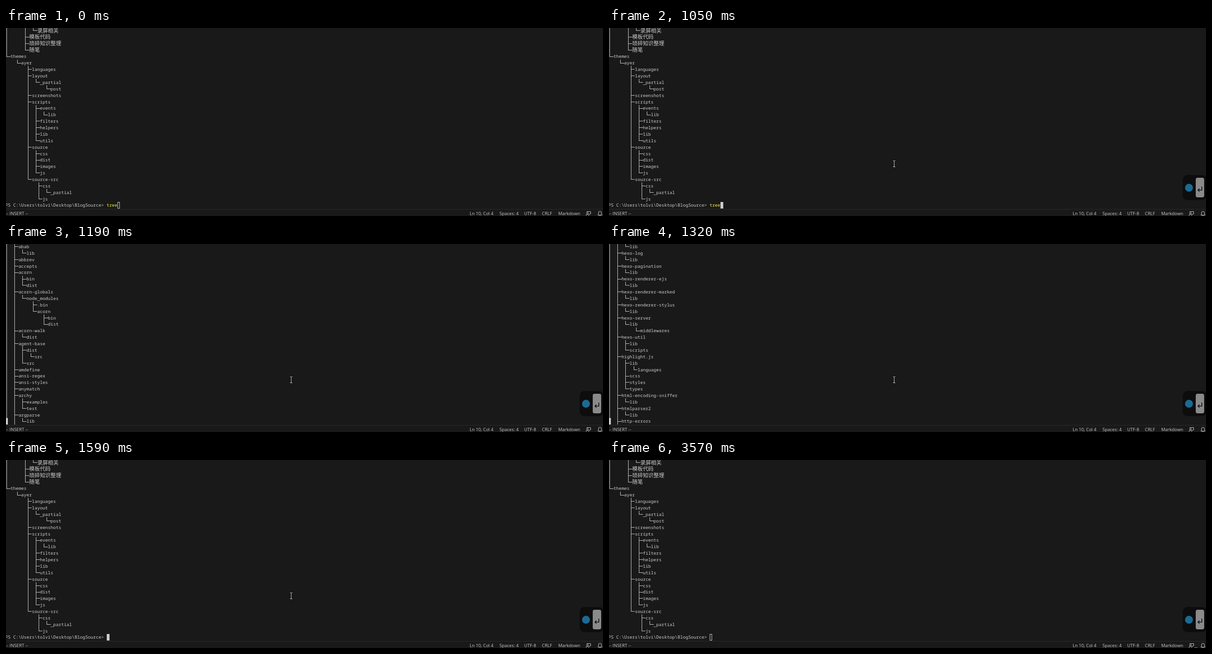
An HTML page with a canvas for the animation above (3700 ms loop, 1280 by 403 pixels).

```html
<!DOCTYPE html>
<html lang="zh-CN">
<head>
<meta charset="utf-8">
<title>tree</title>
<style>
html, body { margin: 0; height: 100%; overflow: hidden; background: #191919; }
canvas { display: block; }
</style>
</head>
<body>
<canvas id="stage" width="1280" height="403"></canvas>
<script>
const g = document.getElementById('stage').getContext('2d');
const LOOP = 3700, ROWS = 28, X0 = -1.7, CELL = 5.72, PITCH = 13.87, MID = 5.2;
const INK = '#cccccc', BACK = '#191919';
const MONO = '9.53px "Noto Sans Mono", monospace';
const HAN = '11.4px "Noto Sans CJK SC", "Noto Sans CJK", sans-serif';
const UI = '9.5px "Open Sans", sans-serif';
const PROMPT = 'PS C:\\Users\\tolvi\\Desktop\\BlogSource> ';

// A folder is a name, or [name, ...children]
const names = text => text.split(' ');
const withLib = text => names(text).map(name => [name, 'lib']);

const plugins = ['plugins',
  ...names('autolinker command-line custom-class diff-highlight'),
  ...names('inline-color jsonp-highlight keep-markup line-highlight'),
  ...names('line-numbers match-braces normalize-whitespace previewers'),
  ...names('remove-initial-line-feed show-invisibles show-language'),
  ...names('toolbar treeview unescaped-markup wpd')];

const modules = ['node_modules', '.bin',
  ['abab', 'lib'], 'abbrev', 'accepts',
  ['acorn', 'bin', 'dist'],
  ['acorn-globals', ['node_modules', '.bin', ['acorn', 'bin', 'dist']]],
  ['acorn-walk', 'dist'],
  ['agent-base', ['dist', 'src'], 'src'],
  ...names('amdefine ansi-regex ansi-styles anymatch'),
  ['archy', 'examples', 'test'],
  ...withLib('argparse asn1'),
  ...names('assert-plus atob aws-sign2 balanced-match basic-auth'),
  ['bluebird', ['js', 'browser', 'release']],
  ...names('brace-expansion bytes caseless'),
  ['camel-case', 'dist', 'dist.es2015'],
  ['chokidar', 'lib', 'types'],
  ...names('color-convert color-name compressible connect'),
  ...withLib('combined-stream cssom depd'),
  ['ejs', 'bin', 'lib'],
  ...names('fill-range fsevents graceful-fs has-flag'),
  ...withLib('hexo-fs hexo-i18n hexo-log hexo-pagination'),
  ...withLib('hexo-renderer-ejs hexo-renderer-marked'),
  ...withLib('hexo-renderer-stylus'),
  ['hexo-server', ['lib', 'middlewares']],
  ['hexo-util', 'lib', 'scripts'],
  ['highlight.js', ['lib', 'languages'], 'scss', 'styles', 'types'],
  ...withLib('html-encoding-sniffer htmlparser2'),
  ...names('http-errors inflight inherits is-binary-path'),
  ...names('is-extglob is-glob is-number isarray'),
  ['js-yaml', 'bin', 'dist', 'lib'],
  ...withLib('jsdom levn'),
  ['marked', 'bin', 'lib', 'src'],
  ...names('micromatch minimatch ms'),
  ['moment', 'dist', 'locale', 'min'],
  ...withLib('negotiator parse5 picomatch'),
  ['prismjs', 'components', plugins, 'themes'],
  ['psl', 'data', 'dist'],
  ...names('punycode range-parser'),
  ['readable-stream', 'lib'], 'readdirp',
  ['resolve', 'example', 'lib', 'test'],
  ...names('rimraf safe-buffer safer-buffer'),
  ['sax', 'lib'],
  ...names('saxes send serve-static'),
  ['source-map', 'dist', 'lib'],
  ...names('statuses strip-ansi supports-color text-table'),
  ['stylus', 'bin', 'lib'],
  ...withLib('symbol-tree tough-cookie type-check'),
  ...names('unpipe vary xmlchars yallist')];

const source = ['source',
  ['_posts', ['工具', '录屏相关'], '模板代码', '琐碎知识整理', '随笔']];

const themes = ['themes', ['ayer', 'languages',
  ['layout', ['_partial', 'post']],
  'screenshots',
  ['scripts', ['events', 'lib'], 'filters', 'helpers', 'lib', 'utils'],
  ['source', 'css', 'dist', 'images', 'js'],
  ['source-src', ['css', '_partial'], 'js']]];

function listing(folders, indent = '') {
  return folders.flatMap((folder, i) => {
    const [name, ...kids] = [folder].flat();
    const last = i === folders.length - 1;
    return [indent + (last ? '└─' : '├─') + name,
      ...listing(kids, indent + (last ? '    ' : '│  '))];
  });
}
const tree = listing([modules, 'scaffolds', source, themes]);
const lines = [...tree.slice(1 - ROWS), PROMPT + 'tree', 'C:.', ...tree, PROMPT];

// First visible line at each scroll step
const at = text => lines.indexOf(text);
const half = (a, b) => Math.round((a + b) / 2);
const top1 = at('│  ├─abab'), top2 = at('│  ├─hexo-log') - 1;
const top3 = at('│  │  │  ├─inline-color'), end = lines.length - ROWS;
const scroll = [[0, 0], [1120, 3], [1190, top1], [1250, half(top1, top2)], [1320, top2],
  [1390, half(top2, top3)], [1460, top3], [1520, half(top3, end)], [1590, end]];

const mouse = [[0, 0, 500], [180, 1039, 388], [250, 800, 282], [310, 681, 287],
  [580, 668, 288], [650, 634, 290], [720, 611, 291], [2050, 668, 300],
  [2120, 910, 340], [2180, 1210, 393], [2250, 0, 500], [3570, 1258, 409]];

const current = (steps, t) => steps.findLast(s => s[0] <= t);

function rect(x, y, w, h, color = INK) {
  g.fillStyle = color;
  g.fillRect(x, y, w, h);
}
function round(x, y, w, h, r, color) {
  g.fillStyle = color;
  g.beginPath();
  g.roundRect(x, y, w, h, r);
  g.fill();
}
function line(width, color, ...points) {
  g.lineWidth = width;
  g.strokeStyle = color;
  g.beginPath();
  points.forEach(([x, y]) => g.lineTo(x, y));
  g.stroke();
}
function arc(x, y, r, from, to) {
  g.lineWidth = 1;
  g.strokeStyle = INK;
  g.beginPath();
  g.arc(x, y, r, from * Math.PI, to * Math.PI);
  g.stroke();
}

function drawLine(text, row) {
  const mid = MID + row * PITCH, y = Math.round(mid);
  const top = Math.round(mid - PITCH / 2), bottom = Math.round(mid + PITCH / 2);
  let col = 0;
  for (const ch of text) {
    const x = X0 + col * CELL, cx = Math.round(x + CELL / 2), right = Math.round(x + CELL);
    if ('│├└'.includes(ch)) rect(cx, top, 1, (ch === '└' ? y + 1 : bottom) - top);
    if ('├└'.includes(ch)) rect(cx, y, right - cx, 1);
    else if (ch === '─') rect(Math.round(x), y, right - Math.round(x), 1);
    else if (ch !== '│' && ch !== ' ') {
      const wide = ch >= '一';
      g.font = wide ? HAN : MONO;
      g.fillStyle = col >= PROMPT.length ? '#f5f543' : INK;
      g.fillText(ch, x, mid + (wide ? 4.4 : 3.8));
      if (wide) col++;
    }
    col++;
  }
}

function drawCaret(t) {
  const col = t < 1120 ? PROMPT.length + 4 : t < 1590 ? 0 : PROMPT.length;
  const x = Math.round(X0 + col * CELL);
  if (t >= 850 && t < 3570) rect(x, 373, 6, 14);
  else {
    g.lineWidth = 1;
    g.strokeStyle = INK;
    g.strokeRect(x + .5, 373.5, 4, 13);
  }
}

function drawStatus() {
  rect(0, 387, 1280, 16, BACK);
  rect(0, 388, 1280, 1, '#2b2b2b');
  g.font = UI;
  g.fillStyle = INK;
  [['-- INSERT --', -1], ['Ln 10, Col 4', 994], ['Spaces: 4', 1058], ['UTF-8', 1111],
    ['CRLF', 1149], ['Markdown', 1184]].forEach(([text, x]) => g.fillText(text, x, 401.3));
  // Feedback and bell icons
  line(1, INK, [1245.5, 394.5], [1245.5, 393.5], [1253.5, 393.5], [1253.5, 398.5],
    [1252, 398.5], [1250.5, 400], [1250.5, 398.5]);
  arc(1246.6, 397, 1.8, 0, 2);
  arc(1246.6, 402.5, 3.1, 1, 2);
  arc(1273.5, 396.2, 3.2, 1, 2);
  line(1, INK, [1270.3, 396], [1270.3, 399], [1269, 401], [1278, 401], [1276.7, 399], [1276.7, 396]);
  arc(1273.5, 401.5, 1.5, 0, 1);
}

function drawKey() {
  round(1230, 315, 52, 54, 10, '#0d0d0d');
  round(1235, 334, 17, 17, 8.5, '#1c6a94');
  round(1258, 321, 18, 42, 4, '#8a8a8a');
  line(1.7, '#111', [1271, 340], [1271, 347.5], [1263, 347.5]);
  line(1.7, '#111', [1266, 344.3], [1262.8, 347.5], [1266, 350.7]);
}

function drawMouse([, x, y]) {
  rect(x, y - 6, 1, 13);
  for (const edge of [y - 7, y + 6]) {
    rect(x - 2, edge, 2, 1);
    rect(x + 1, edge, 2, 1);
  }
}

function draw(now) {
  const t = now % LOOP, first = current(scroll, t)[1];
  rect(0, 0, 1280, 403, BACK);
  lines.slice(first, first + ROWS).forEach(drawLine);
  drawCaret(t);
  drawStatus();
  if (t >= 1050) drawKey();
  drawMouse(current(mouse, t));
  requestAnimationFrame(draw);
}
requestAnimationFrame(draw);
</script>
</body>
</html>
```
